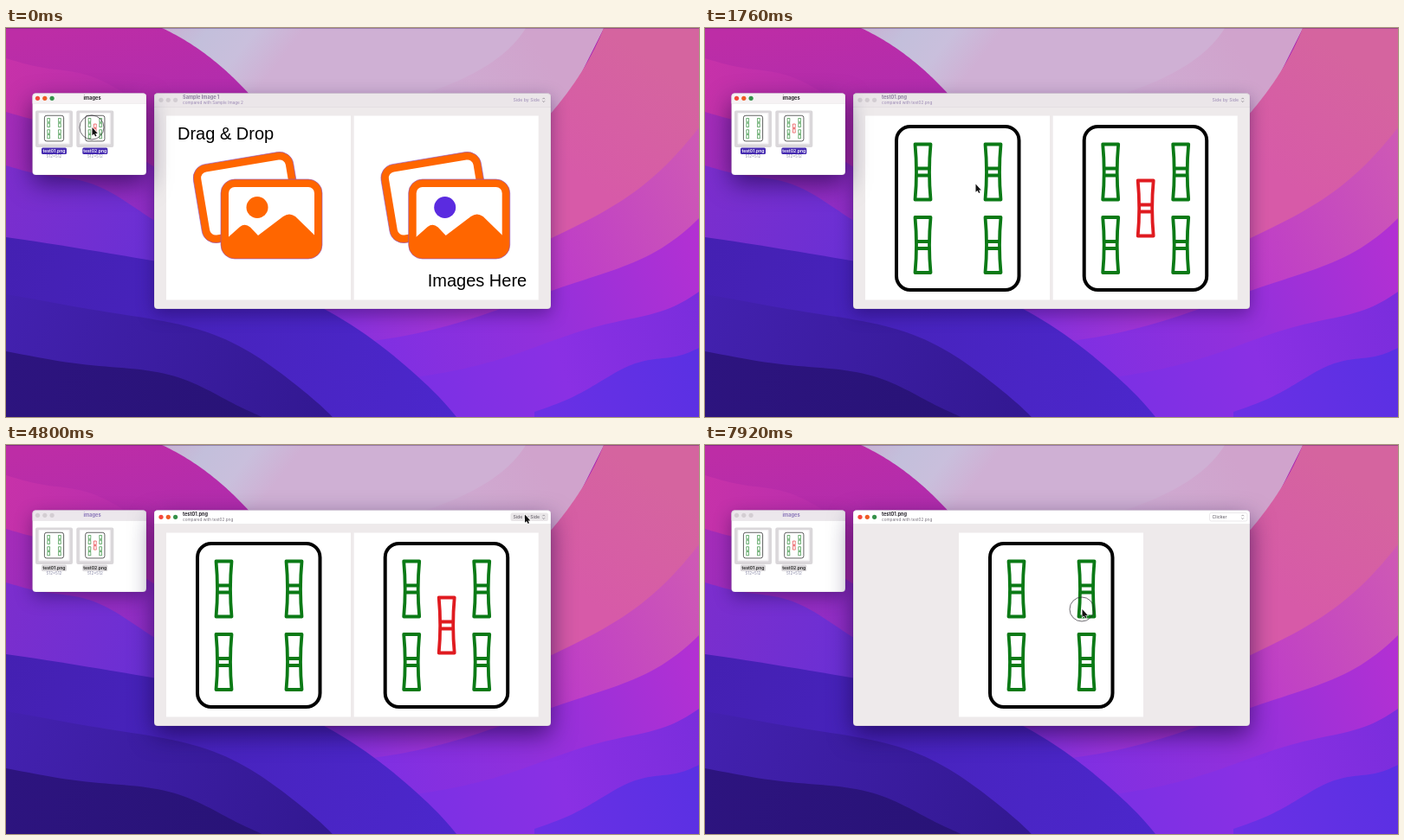
Recreate the animation shown at these times as an HTML page with a canvas. Size 800 by 450 pixels, loop 8 s.

```html
<!DOCTYPE html>
<html lang="en">
<head>
<meta charset="utf-8">
<title>Image comparison</title>
<style>
html, body { margin: 0; width: 100%; height: 100%; overflow: hidden; background: #4a24c0; }
canvas { display: block; width: 800px; height: 450px; }
</style>
</head>
<body>
<canvas id="stage" width="800" height="450"></canvas>
<script>
const W = 800, H = 450;
const stage = document.getElementById('stage');
const screen = stage.getContext('2d');
let c = screen;
const LOOP = 8000, STEP = 80;
const ORANGE = '#ff6600', GREEN = '#0b7a16', RED = '#e01b20', INDIGO = '#5b2be0', EDGE = '#8a50cc';
const DROP = 1120, LOADED = 1360, FOCUS = 3120, HOVER = 4400;
const MENU = 5120, CHOSEN = 6080, PRESS = 7760;

function box(x, y, w, h, r, fill, line, width = 1) {
  c.beginPath();
  c.roundRect(x, y, w, h, r);
  if (fill) { c.fillStyle = fill; c.fill(); }
  if (line) { c.strokeStyle = line; c.lineWidth = width; c.stroke(); }
}

function dot(x, y, r, fill) {
  c.beginPath();
  c.arc(x, y, r, 0, 7);
  c.fillStyle = fill;
  c.fill();
}

function label(s, x, y, size, fill, weight = 400, align = 'left', family = 'Inter, sans-serif') {
  c.font = `${weight} ${size}px ${family}`;
  c.textAlign = align;
  c.fillStyle = fill;
  c.fillText(s, x, y);
}

function at(x, y, scale, draw) {
  c.save();
  c.translate(x, y);
  c.scale(scale, scale);
  draw();
  c.restore();
}

function shadowed(color, blur, drop, draw) {
  c.save();
  c.shadowColor = color;
  c.shadowBlur = blur;
  c.shadowOffsetY = drop;
  draw();
  c.restore();
}

function blend([x0, y0], [x1, y1], colors) {
  const g = c.createLinearGradient(x0, y0, x1, y1);
  colors.forEach((k, i) => g.addColorStop(i / (colors.length - 1), k));
  return g;
}

// Hill line from a to b, pulled towards m, with a slight swell; filled out to the corners.
function hill(a, m, b, corners, colors, swell = 4) {
  c.beginPath();
  for (let t = 0; t <= 1.001; t += .02) {
    const mix = k => (1 - t) ** 2 * a[k] + 2 * t * (1 - t) * m[k] + t * t * b[k];
    c.lineTo(mix(0), mix(1) + swell * Math.sin(t * 3 * Math.PI));
  }
  corners.forEach(p => c.lineTo(...p));
  c.closePath();
  c.fillStyle = blend(a, b, colors);
  c.fill();
}

function wallpaper() {
  c.fillStyle = blend([60, 0], [110, 250], ['#bd2da6', '#b02cae', '#8a2ec8']);
  c.fillRect(0, 0, W, H);

  [['#c732a9', '#b02cb0'], ['#a42cb8', '#8a2ec8'], ['#7c2ecd', '#6630d6']].forEach((colors, i) => {
    const y = 35 + 62 * i;
    hill([0, y], [100, y + 10], [220, y + 90], [[220, H], [0, H]], colors);
  });

  hill([180, 0], [236, 26], [284, 80], [[640, 100], [690, 0]],
    ['#c9b0d2', '#c3bfdb', '#c9bfdc', '#cfb0d4'], 0);
  hill([600, 0], [570, 50], [470, 80], [[640, 100], [690, 0]], ['#d0a3cc', '#cfaed4'], 0);
  hill([690, 0], [665, 65], [600, 130], [[600, H], [W, H], [W, 0]], ['#d5649f', '#d75aa8'], 0);

  [
    ['#cf5ab4', '#bb38cb', '#7e2fe0'],
    ['#b430d2', '#9030dc', '#7a2fe4'],
    ['#7a2ddc', '#8a30e4', '#7a30e4'],
    ['#5a30e3', '#6a30e5']
  ].forEach((colors, i) => {
    const left = 340 + 30 * i * i;
    hill([W, 115 + i * (115 - 10 * i)], [650 + 30 * i, 290 + 30 * i], [left, 330 + 38 * i],
      [[left, H], [W, H]], colors);
  });

  [['#4420b2', '#4c27cc'], ['#4321af', '#321891'], ['#2d147f', '#281377']].forEach((colors, i) => {
    const y = 242 + 66 * i, x = 520 / (1 + .38 * i);
    hill([0, y], [x * .77, y + 36 - 6 * i], [x, H], [[0, H]], colors);
  });

  c.fillStyle = 'rgba(50,20,90,.35)';
  c.fillRect(0, 0, W, 1);
}

function stick(x, y, color) {
  c.beginPath();
  c.moveTo(x - 9, y - 32);
  c.lineTo(x + 9, y - 32);
  c.quadraticCurveTo(x + 6, y, x + 9, y + 32);
  c.lineTo(x - 9, y + 32);
  c.quadraticCurveTo(x - 6, y, x - 9, y - 32);
  c.closePath();
  for (const dy of [-4, 4]) {
    c.moveTo(x - 7, y + dy);
    c.lineTo(x + 7, y + dy);
  }
  c.strokeStyle = color;
  c.lineWidth = 3.8;
  c.lineJoin = 'round';
  c.stroke();
}

// Test picture on a 213 px square.
function tile(withRed) {
  box(0, 0, 213, 213, 0, '#fff');
  box(36, 12.5, 141.5, 189, 16, null, '#000', 4);
  for (const x of [66.5, 147.5]) for (const y of [65, 149.5]) stick(x, y, GREEN);
  if (withRed) stick(107, 107, RED);
}

// Photo frame centred on the origin.
function photo() {
  box(-58.5, -46, 117, 92, 16, ORANGE, EDGE, .6);
  box(-49.5, -37, 99, 74, 7, '#fff');
}

function photos(sun) {
  at(94, 94.5, 1, () => { c.rotate(-.166); photo(); });
  at(121.5, 119.5, 1, photo);
  c.fillStyle = ORANGE;
  c.fill(new Path2D('M71 141L85 128.500Q91 124 97 129L106 138.500L135 116.500Q142 111.500 149 116.500L172 139V159H71Z'));
  dot(105, 106, 12.5, sun);
}

function sample(second) {
  box(0, 0, 213, 213, 0, '#fff');
  photos(second ? INDIGO : ORANGE);
  const font = '"Liberation Sans", Arial, sans-serif';
  if (second) label('Images Here', 199.5, 197, 20, '#000', 400, 'right', font);
  else label('Drag & Drop', 13, 27.5, 20, '#000', 400, 'left', font);
}

function frame(x, y, w, h, bar, body, head, active) {
  shadowed(`rgba(20,0,60,${active ? .6 : .4})`, active ? 28 : 20, active ? 10 : 6,
    () => box(x, y, w, h, 4, body));
  box(x, y, w, bar, [4, 4, 0, 0], head);
  c.fillStyle = 'rgba(0,0,0,.07)';
  c.fillRect(x, y + bar - .5, w, .5);
  box(x, y, w, h, 4, null, 'rgba(60,30,80,.25)', .5);
}

function lights(x, y, on) {
  const colors = on ? ['#f4473c', '#ee5b24', '#35904a'] : Array(3).fill('#d3cdd2');
  colors.forEach((k, i) => dot(x + i * 8.3, y, 2.6, k));
}

function thumb(i) {
  at(38.75 + 47.3 * i, 99.3, .157, () => tile(i));
}

function folder(active) {
  frame(30.5, 75.5, 131.5, 94.5, 12, '#fff', active ? '#f6f2f4' : '#ece7ec', active);
  lights(36.5, 81.3, active);
  label('images', 99.5, 83.3, 5.7, active ? '#2a272c' : '#8d79ba', 700, 'center');
  ['test01.png', 'test02.png'].forEach((name, i) => {
    const x = 55.5 + 47.3 * i;
    box(x - 21.5, 95.5, 43, 42.5, 2, '#dad7da');
    box(x - 18, 98, 36, 36.5, 1, '#f4f2f4');
    thumb(i);
    box(x - 14.5, 138.6, 29, 7.4, 1.5, active ? '#4429b0' : '#d9d6d9');
    label(name, x, 144.2, 5.1, active ? '#fff' : '#222', 600, 'center');
    label('512×512', x, 150.4, 4.6, '#8585a4', 400, 'center');
  });
}

function chevrons(x, y) {
  c.beginPath();
  for (const s of [-1, 1]) {
    c.moveTo(x - 1.3, y + s);
    c.lineTo(x, y + s * 2.4);
    c.lineTo(x + 1.3, y + s);
  }
  c.strokeStyle = '#66606a';
  c.lineWidth = .6;
  c.stroke();
}

function picker(t, active) {
  const chosen = t >= CHOSEN;
  if (chosen) box(582.5, 78.5, 43.5, 9.5, 2, '#fff', '#dedade', .6);
  else if (t >= HOVER) box(582.5, 78.5, 43.5, 9.5, 2, '#e9e6e8');
  label(chosen ? 'Clicker' : 'Side by Side', 585.5, 85.1, 5.2, active ? '#55505a' : '#9a88b4');
  chevrons(620.7, 83.3);
}

function menu(t, [, y]) {
  if (t < MENU || t >= CHOSEN) return;
  shadowed('rgba(0,0,0,.3)', 8, 2, () => box(577, 76.5, 50, 27, 3, '#f2eff2'));
  const row = y > 87 ? 1 : 0;
  box(579, 78 + row * 12, 46, 12, 2, INDIGO);
  ['Side by Side', 'Clicker'].forEach((s, i) =>
    label(s, 585.5, 85.8 + i * 12, 5.2, i === row ? '#fff' : '#333'));
}

function viewer(t) {
  const active = t >= FOCUS, loaded = t >= LOADED;
  frame(171, 75.5, 458, 249.5, 16, '#eeeaeb', active ? '#fff' : '#ebe6e9', active);
  lights(179, 83.3, active);
  const [one, two] = loaded ? ['test01.png', 'test02.png'] : ['Sample Image 1', 'Sample Image 2'];
  label(one, 204, 82.4, 5.6, active ? '#26222a' : '#8d80a0', 700);
  label('compared with ' + two, 204, 88.2, 4.7, active ? '#77717c' : '#9a88b4');
  picker(t, active);
  if (t >= CHOSEN) {
    at(293, 101.5, 1, () => tile(t < PRESS));
    return;
  }
  const draw = loaded ? tile : sample;
  at(185, 101.5, 1, () => draw(false));
  at(401.7, 101.5, 1, () => draw(true));
}

const home = [99.5, 115];
const moves = [
  { start: 160, to: [312.5, 180.5] },
  { start: 2600, to: [379, 182.5] },
  { start: 3520, to: [599, 80.5] },
  { start: 5440, to: [599, 92.5] },
  { start: 6600, to: [435.5, 190] }
];

// Longer ways take longer; every move eases in and out.
function pointer(t) {
  let [x, y] = home;
  for (const { start, to } of moves) {
    const dx = to[0] - x, dy = to[1] - y;
    const u = Math.min(1, Math.max(0, (t - start) / (300 + 2.7 * Math.hypot(dx, dy))));
    const e = u * u * (3 - 2 * u);
    x += dx * e;
    y += dy * e;
    if (u < 1) break;
  }
  return [x, y];
}

const clicks = [FOCUS, MENU - STEP, CHOSEN - STEP];
const pressed = t => t < DROP || t >= PRESS || clicks.some(s => t >= s && t < s + 160);
const arrow = new Path2D('M0 0V9.300L2.100 7.400L3.600 10.500L5 9.800L3.600 6.900H6.300Z');

function cursor(t, [x, y]) {
  if (pressed(t)) {
    c.beginPath();
    c.arc(x - .5, y, 14, 0, 7);
    c.strokeStyle = 'rgba(45,40,50,.85)';
    c.lineWidth = .8;
    c.stroke();
  }
  at(x, y, 1, () => {
    c.strokeStyle = '#fff';
    c.lineWidth = 1.2;
    c.stroke(arrow);
    c.fillStyle = '#111';
    c.fill(arrow);
  });
}

function dragged(t, [x, y]) {
  if (t <= moves[0].start || t >= DROP) return;
  at(x - home[0], y - home[1], 1, () => {
    c.globalAlpha = .5;
    thumb(0);
    thumb(1);
  });
}

const desk = document.createElement('canvas');
desk.width = W;
desk.height = H;
c = desk.getContext('2d');
wallpaper();
c = screen;

function render(now) {
  const t = Math.floor(now % LOOP / STEP) * STEP;
  const tip = pointer(t);
  c.drawImage(desk, 0, 0);
  if (t < FOCUS) { viewer(t); folder(true); }
  else { folder(false); viewer(t); }
  menu(t, tip);
  dragged(t, tip);
  cursor(t, tip);
}

const start = performance.now();
function tick() {
  render(performance.now() - start);
  requestAnimationFrame(tick);
}
tick();
</script>
</body>
</html>
```
